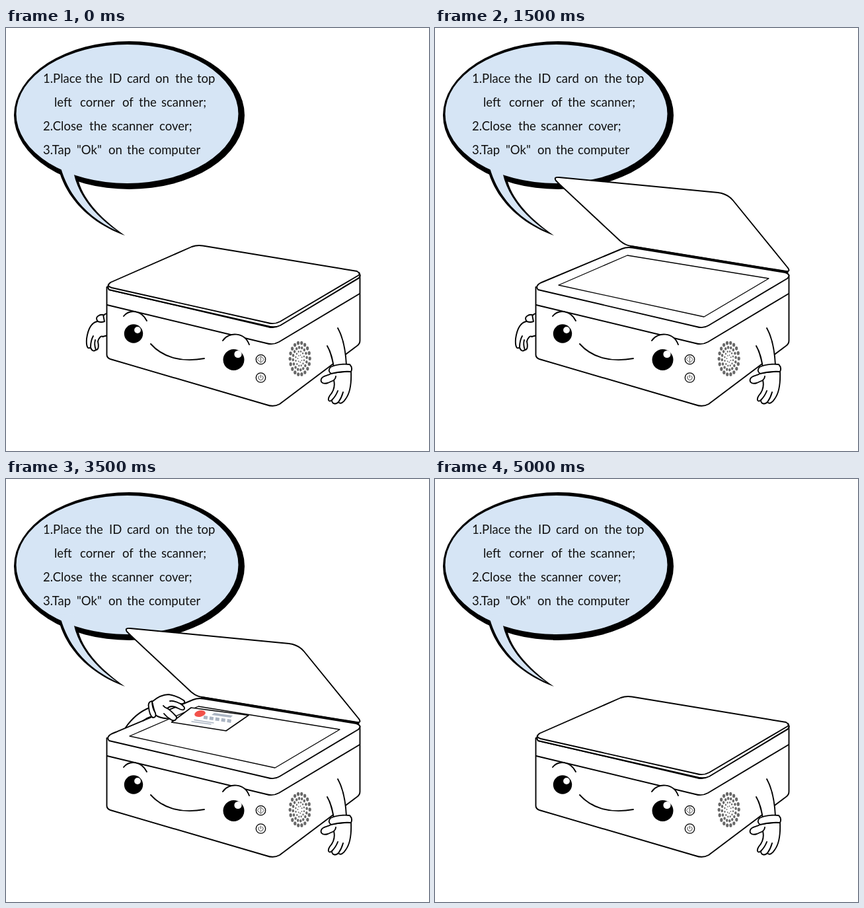
Animation of 640x640 px, one loop 7.5 s. Source, as an HTML page:

```html
<!DOCTYPE html>
<html lang="en">
<head>
<meta charset="utf-8">
<title>Scanner guide</title>
<style>
  html, body { margin: 0; width: 100%; height: 100%; overflow: hidden; background: #fff; }
  svg { display: block; width: 100%; height: 100%; }
  text { font: 18.5px Lato, "Open Sans", sans-serif; fill: #111; stroke: none; }
  .ink { fill: #fff; stroke: #000; stroke-width: 1.9; stroke-linecap: round; stroke-linejoin: round; }
  .line { fill: none; }
  .thin { stroke-width: 1.3; }
  .solid { fill: #000; stroke: none; }
  .shine { fill: #fff; stroke: none; }
  .blue { fill: #d6e5f5; }
  .grey { fill: #aab4c2; stroke: none; }
</style>
</head>
<body>
<svg viewBox="0 0 640 640">
  <defs>
    <g id="gripUp">
      <path d="M179 378C174 371 169 362 168 351C168 343 170 336 174 335C176 331 182 331 184 335C187 332 190 334 189 339L190 347C196 348 201 354 205 363"/>
      <path d="M203 347C208 346 211 351 209 356C208 360 206 362 203 364"/>
      <path class="thin" d="M183.500 269L209 289.500L205 365L183 335Z"/>
      <path d="M183 335C179 340 178 346 181 351C185 349 188 347 190 347C191 352 188 357 186 362Q185 367 188 372"/>
      <path class="line" d="M174 335Q171 342 174 350M190 347Q198 354 204 363"/>
    </g>
    <g id="reach">
      <path class="line" d="M181 376C190 363 202 352 217 346M207 366Q214 361 221 359"/>
      <path d="M221 337C228 331 237 326 246 326C254 327 263 331 269 335C272 338 269 341 264 340C268 343 272 346 269 349C265 351 260 346 256 345C251 343 247 344 244 347C249 350 253 354 258 360C258 366 253 367 248 363C240 362 232 362 226 357Z"/>
      <path class="line" d="M264 340C258 337 253 335 248 336M244 347Q240 346 238 343M248 363Q243 360 239 355"/>
      <path d="M221 336Q214 337 216 346Q217 357 222 361Q228 361 226 354Q221 346 221 336Z"/>
    </g>
    <g id="idCard">
      <path stroke-width="1.600" d="M280 346L367 357.500L333 381L250.500 368Z"/>
      <ellipse cx="293.500" cy="355" rx="8.500" ry="4.800" transform="rotate(-12 293.500 355)" fill="#f2524b" stroke="none"/>
      <path class="grey" d="M315 354L343 358L340 361L311 357Z"/>
      <path class="line" stroke="#aab4c2" stroke-width="5" stroke-dasharray="6 3" stroke-linecap="butt" d="M299 360.500L341 366.500"/>
      <path class="line" stroke="#aab4c2" stroke-width="1.400" d="M285 364.500L314 369M281 367L310 371"/>
    </g>
  </defs>

  <g id="bubble">
    <path class="solid" d="M78 207C88 255 125 294 180 314C148 292 118 262 110 232L104 213Z"/>
    <ellipse class="solid" cx="186.500" cy="132" rx="174.500" ry="112"/>
    <ellipse class="blue" cx="183.500" cy="130" rx="168" ry="105"/>
    <path class="blue" d="M81 204C92 251 122 286 168 307C136 285 110 255 102.500 220L104 205Z"/>
  </g>

  <g class="ink">
    <g data-lid="mid">
      <path d="M168 267Q165 262 173 263L410 294Q425 296 434 303L533 365Q536 369 530 368L297 330Q288 329 280 325L173 272Q170 270 168 267Z"/>
      <path class="line" stroke-width="3.400" d="M297 331L533 369.500"/>
    </g>
    <g data-lid="open">
      <path d="M183 231Q179 225 188 226L428 249Q443 251 451 261L534 363Q538 369 531 368L297 330Q288 329 280 322L189 237Z"/>
      <path class="line" stroke-width="3.400" d="M297 331L533 369.500"/>
    </g>

    <g data-arm="rest">
      <path class="line" d="M154 432Q149 432 147 436M146 467L154 465"/>
      <path d="M138 444C129 446 124 456 122 470C121 482 124 487 128 483C129 488 133 490 136 487C141 487 140 479 139 474C141 468 144 465 147 467"/>
      <path class="line" d="M128 483Q128 473 132 466M136 487Q133 479 135 472"/>
      <path d="M139 436Q135 439 139 444Q144 446 149 444L147 434Q143 433 139 436Z"/>
    </g>
    <use data-arm="lift" href="#gripUp" transform="translate(154 474) rotate(-40) translate(-176 -378)"/>
    <use data-arm="hold" href="#gripUp"/>
    <g data-arm="wave">
      <path d="M178 371C170 362 167 351 170 340C169 332 174 327 178 331C179 324 187 323 189 329C190 335 189 341 191 348C196 343 200 338 205 337C211 336 211 341 206 346C206 354 204 361 200 365Z"/>
      <path class="line" d="M178 331Q178 342 182 349M191 348Q187 351 187 356M206 346Q201 348 198 352"/>
      <path d="M178 370Q175 374 179 378L206 366Q205 363 202 363C195 369 187 372 178 370Z"/>
    </g>

    <path d="M152.500 392V493Q152 499 158 501L394 570Q405 574 414 569L531 481Q535.500 478 535.500 473V374L405 400Z"/>
    <path d="M156 396Q151 390 160 385.500L283 334Q290 331 299 332.500L530 370Q539 373 533 379L414 450Q406 455 396 452Z"/>
    <path class="thin" d="M187 389L291 344L505 379L407 437Z"/>
    <path class="line" d="M153 419L394 477Q404 480 413 475L535 402"/>

    <path d="M178 436C187 425 205 427 213 443M328 473C337 459 361 460 368 479"/>
    <path class="line" d="M219 478C235 496 262 507 300 500"/>
    <circle class="solid" cx="193" cy="462.500" r="14.200"/>
    <circle class="shine" cx="199" cy="457" r="4.900"/>
    <circle class="solid" cx="344.500" cy="502" r="16"/>
    <circle class="shine" cx="351" cy="493.500" r="5.600"/>

    <circle class="thin" cx="385.500" cy="501.500" r="7.200"/>
    <path class="line" stroke="#444" stroke-width=".9" d="M385.500 496.500L390.500 501.500L385.500 506.500L380.500 501.500ZM385.500 498V505"/>
    <circle class="thin" cx="385.500" cy="529" r="7.200"/>
    <path class="line" stroke="#444" stroke-width="1" d="M383 526.500A3.600 3.600 0 1 0 388 526.500M385.500 525V529"/>
    <g id="speaker" fill="#686868" stroke="none"></g>

    <path class="shine" d="M486 481C492 491 494 502 496 513L515 510C514 490 511 470 502 454Z"/>
    <path class="line" d="M486 481C492 491 494 502 496 513M502 454C511 470 514 490 515 510"/>
    <path d="M493 522C487 527 479 525 477 531C475 537 481 539 487 537L496 533C498 541 496 549 490 556C486 562 488 567 493 563C493 569 499 570 503 566C506 570 511 566 514 561C520 553 523 540 522 519Z"/>
    <path class="line" d="M493 563Q499 557 502 549M503 566Q508 559 510 551M496 533Q499 530 499 527"/>
    <path d="M491 513C500 509 511 508 520 509Q525 514 522 520C511 519 500 521 492 523Q486 519 491 513Z"/>

    <g data-arm="lay">
      <path class="thin" d="M275 331.500L352 335.500L317 361.500L247 359Z"/>
      <use href="#reach"/>
    </g>
    <use data-arm="drop wave" href="#idCard"/>
    <use data-arm="drop" href="#reach"/>

    <path data-lid="low" d="M154 364Q149 360 157 358L281 331Q290 329 299 331L530 369Q536 371 529 374L417 408Q406 412 394 410Z"/>
    <g data-lid="closed">
      <path d="M156 396Q152 390 158 385L281 331Q289 328 298 329.500L531 368Q538 372 534 378L415 450Q406 454 396 451Z"/>
      <path class="line" d="M155 388Q154 391 160 393L396 446Q406 449 415 444L532 375Q536 373 534 370"/>
    </g>
  </g>
</svg>

<script>
const NS = "http://www.w3.org/2000/svg";
const add = (parent, tag, attrs, text = "") => {
  const el = document.createElementNS(NS, tag);
  for (const k in attrs) el.setAttribute(k, attrs[k]);
  el.textContent = text;
  parent.append(el);
};

// Each line of speech: words and where they begin.
const speech = [
  ["1.Place the ID card on the top", [56, 120, 156, 183, 226, 256, 289]],
  ["left corner of the scanner;", [73, 112, 176, 201, 235]],
  ["2.Close the scanner cover;", [56, 126, 160, 232]],
  ['3.Tap "Ok" on the computer', [56, 107, 155, 183, 216]]
];
const bubble = document.getElementById("bubble");
speech.forEach(([line, starts], row) =>
  line.split(" ").forEach((word, i) => add(bubble, "text", { x: starts[i], y: 83 + row * 36 }, word)));

// Rings of speaker holes: radius x, radius y, count, hole size.
const speaker = document.getElementById("speaker");
for (const [rx, ry, n, r] of [[15, 24, 18, 2.1], [10.5, 17, 16, 1.7], [6.5, 11, 12, 1.1], [3.2, 5.5, 7, .8]]) {
  for (let i = 0; i < n; i++) {
    const a = i / n * 2 * Math.PI + rx;
    add(speaker, "ellipse", {
      cx: (444.7 + rx * Math.cos(a)).toFixed(1), cy: (500.3 + ry * Math.sin(a)).toFixed(1), rx: r, ry: r * 1.35
    });
  }
}

const STEP = 500, LOOP = 7500;
const poses = [
  ["closed", "rest"], ["low", "rest"], ["mid", "rest"], ["open", "rest"],
  ["open", "lift"], ["open", "hold"], ["open", "lay"], ["open", "drop"],
  ["open", "wave"], ["low", "none"], ["closed", "none"]
];
const lids = document.querySelectorAll("[data-lid]");
const arms = document.querySelectorAll("[data-arm]");

function show(time) {
  const step = Math.floor(time % LOOP / STEP);
  const [lid, arm] = poses[Math.min(step, poses.length - 1)];
  for (const el of lids) el.style.display = el.dataset.lid === lid ? "" : "none";
  for (const el of arms) el.style.display = el.dataset.arm.split(" ").includes(arm) ? "" : "none";
}

let start;
function tick(now) {
  start ??= now;
  show(now - start);
  requestAnimationFrame(tick);
}
show(0);
requestAnimationFrame(tick);
</script>
</body>
</html>
```
